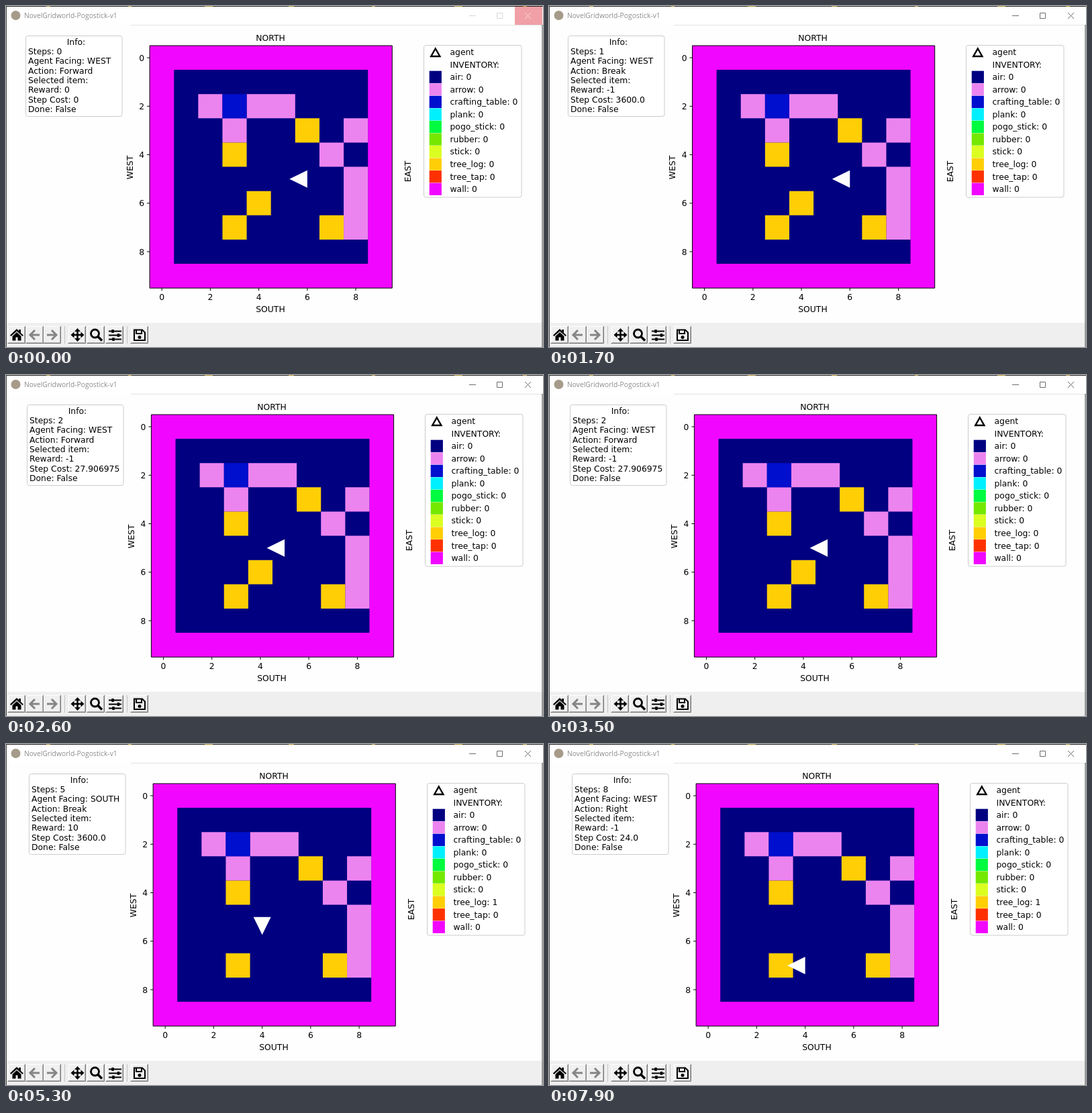
An HTML page that plays this animation: 800 px wide and 508 px high, repeating every 8000 ms.

```html
<!DOCTYPE html>
<html lang="en">
<head>
<meta charset="utf-8">
<title>Gridworld</title>
<style>
html, body { margin: 0; width: 100%; height: 100%; overflow: hidden; background: #fefefe; }
svg { display: block; width: 800px; height: 508px; }
text { font: 12.35px "DejaVu Sans", sans-serif; white-space: pre; }
.title { font: 10.3px "Open Sans", sans-serif; fill: #8c8c8c; }
.mid { text-anchor: middle; }
.end { text-anchor: end; }
.frame { fill: #fff; fill-opacity: .8; stroke: #ccc; }
.line { fill: none; stroke: #000; }
.crisp { shape-rendering: crispEdges; }
</style>
</head>
<body>
<svg viewBox="0 0 800 508">
  <rect width="800" height="508" fill="#fefefe"/>
  <rect width="800" height="28" fill="#fff"/>
  <path class="crisp" d="M186 28.5H800" stroke="#e4e4e4"/>
  <circle cx="14.5" cy="14" r="7" fill="#a69b8a"/>
  <text class="title" x="27" y="18">NovelGridworld-Pogostick-v1</text>
  <g id="controls"></g>
  <g id="plot"></g>
  <rect y="472" width="800" height="36" fill="#f0eff0"/>
  <g id="toolbar"></g>
  <path class="crisp" d="M0 .5H800" stroke="#25231f"/>
  <path class="crisp" d="M60 .5h6M182 .5h5M296 .5h12M421 .5h8M545 .5h5M668 .5h12M770 .5h6" stroke="#a98a2c"/>
  <path d="M.5 0V508M799 28V508" stroke="#444"/>
</svg>
<script>
const LOOP = 8000, CELL = 36.12, LEFT = 214.1, TOP = 59;

const ITEMS = {
  air: '#000080', arrow: '#ec84ef', crafting_table: '#000ecd', plank: '#00f0ff',
  pogo_stick: '#00fb3f', rubber: '#74e800', stick: '#dbff20', tree_log: '#ffce05',
  tree_tap: '#ff3100', wall: '#f107ff'
};
const SYMBOLS = { a: 'arrow', c: 'crafting_table', l: 'tree_log' };
const MAP = ['', '', '..acaa', '...a..l.a', '...l...a', '........a', '....l...a', '...l...la'];

const ANGLES = { WEST: 0, SOUTH: -90 };
const MOVE = 27.906975;

// [start ms, facing, action, reward, cost, agent column, agent row, figure shift]
const STEPS = [
  [0, 'WEST', 'Forward', 0, '0', 6, 5, 0],
  [1200, 'WEST', 'Break', -1, '3600.0', 6, 5, -0.6],
  [2200, 'WEST', 'Forward', -1, MOVE, 5, 5, 2.3],
  [3600, 'WEST', 'Forward', -1, MOVE, 4, 5, 5],
  [4400, 'SOUTH', 'Left', -1, '24.0', 4, 5, 5],
  [4800, 'SOUTH', 'Break', 10, '3600.0', 4, 5, 5],
  [5700, 'SOUTH', 'Forward', -1, MOVE, 4, 6, 5],
  [6500, 'SOUTH', 'Forward', -1, MOVE, 4, 7, 5],
  [6900, 'WEST', 'Right', -1, '24.0', 4, 7, 5]
];
const LOG_TAKEN = 5;

const el = id => document.getElementById(id);
const rect = (x, y, w, h, fill) =>
  `<rect x="${x}" y="${y}" width="${w}" height="${h}" fill="${fill}"/>`;
const path = (d, attrs = '') => `<path class="line" d="${d}" ${attrs}/>`;
const text = (s, x, y, cls = '', attrs = '') =>
  `<text class="${cls}" x="${x}" y="${y}" ${attrs}>${s}</text>`;
const upright = (s, x, y) => text(s, 0, 0, 'mid', `transform="translate(${x} ${y}) rotate(-90)"`);

function drawGrid(shift, logTaken) {
  const X = c => LEFT + c * CELL + shift;
  const Y = r => TOP + r * CELL;
  const box = (c, r, size) => `M${X(c)} ${Y(r)}H${X(c + size)}V${Y(r + size)}H${X(c)}Z`;

  // One path per item, so that neighbouring cells join without a seam.
  const shapes = { wall: box(0, 0, 10), air: box(1, 1, 8) };
  MAP.forEach((row, r) => [...row].forEach((symbol, c) => {
    const name = SYMBOLS[symbol], taken = logTaken && c === 4 && r === 6;
    if (name && !taken) shapes[name] = (shapes[name] || '') + box(c, r, 1);
  }));
  let out = Object.entries(shapes)
    .map(([name, d]) => `<path d="${d}" fill="${ITEMS[name]}"/>`).join('');

  let lines = box(0, 0, 10);
  for (let i = 0; i < 10; i += 2) {
    const x = X(i + .5), y = Y(i + .5);
    lines += `M${x} ${Y(10)}v4M${X(0)} ${y}h-4`;
    out += text(i, x, 438, 'mid') + text(i, X(0) - 8, y + 4.5, 'end');
  }
  return out + path(lines);
}

function drawInfo(lines) {
  return '<rect class="frame" x="29.5" y="44.5" width="143.5" height="120" rx="3"/>' +
    text('Info:', 104.5, 57.5, 'mid') +
    lines.map((line, i) => text(line, 33, 72 + i * 14.35)).join('');
}

function drawLegend(logs) {
  const labels = Object.entries(ITEMS).map(([name, color], i) => {
    const y = 105.8 + i * 18.55;
    return rect(630.7, y - 9.1, 18.2, 18.2, color) +
      text(`${name}: ${name === 'tree_log' ? logs : 0}`, 661.5, y + 4.3);
  });
  return '<rect class="frame" x="622.5" y="58.5" width="145.5" height="226.5" rx="3"/>' +
    path('M639.8 63.5L646.4 75H633.2Z', 'stroke-width="2.4"') +
    text('agent', 661.5, 73) + text('INVENTORY:', 661.5, 91.5) + labels.join('');
}

function drawControls(fading) {
  const color = fading ? '#d8d8d8' : '#6c6c6c';
  return (fading ? rect(758, 1, 41, 27, '#f0a0a6') : '') +
    path('M690 14.5h10M731.5 10.5h8v8h-8z', `style="stroke:${color}"`) +
    path('M773 10l9 9m0-9l-9 9', `style="stroke:${fading ? '#f8dcde' : color}"`);
}

function drawToolbar() {
  const buttons = [3, 30, 56, 93, 121, 149, 186].map(x =>
    rect(x, 477, 26, 26, '#f0f0f0') +
    path(`M${x + .5} 502.5v-25h25`, 'style="stroke:#fff"') +
    path(`M${x + 24.5} 478v23.5h-24`, 'style="stroke:#b4b4b4"') +
    path(`M${x + 25.5} 477v25.5h-26`, 'style="stroke:#767676"')).join('');
  const separators = path('M87.5 477v26M180.5 477v26', 'style="stroke:#c4c4c4"');
  const arrow = (x, dir) =>
    path(`M${x + 8 * dir} 490h${-15 * dir}M${x} 483l${7 * dir} 7l${-7 * dir} 7`,
      'style="stroke:#858585" stroke-width="3"');
  const home = '<path d="M6 490.5L16 481l3 3v-2h3v5l4 3.5-1.5 1.5L16 484.5 7.5 492ZM9.5 492L16 486l6.5 6v6.5h-5v-5h-3v5h-5Z"/>';
  const pan = path('M98 490h17M106.5 482v17', 'stroke-width="2.6"') +
    '<path d="M106.5 480l4.5 5h-9zM106.5 500l4.5-5h-9zM96.5 490l5-4.5v9zM116.5 490l-5-4.5v9z"/>';
  const zoom = '<circle class="line" cx="132.5" cy="488" r="6" stroke-width="2.8"/>' +
    path('M137 492.5l6 6', 'stroke-width="3.6"');
  const sliders = path('M153 484.5h19M153 490.5h19M153 496.5h19', 'stroke-width="2"') +
    path('M159 482v5M167.5 488v5M160 494v5', 'stroke-width="3.4"');
  const save = path('M191 482.5h12l4 4v11.5h-16zM194 483v5h8v-5', 'stroke-width="2"') +
    '<circle cx="199" cy="493.5" r="2.5"/>';
  return buttons + separators + home + arrow(43, -1) + arrow(68, 1) + pan + zoom + sliders + save;
}

function drawStep(n) {
  const [, facing, action, reward, cost, col, row, shift] = STEPS[n];
  const logTaken = n >= LOG_TAKEN;
  const x = LEFT + (col + .5) * CELL + shift, y = TOP + (row + .5) * CELL;
  const info = [`Steps: ${n}`, `Agent Facing: ${facing}`, `Action: ${action}`, 'Selected item:',
    `Reward: ${reward}`, `Step Cost: ${cost}`, 'Done: False'];

  el('controls').innerHTML = drawControls(n === 0);
  el('plot').innerHTML = drawGrid(shift, logTaken) +
    `<path d="M-26.5 0L0-13V13Z" fill="#fff" transform="translate(${x} ${y}) rotate(${ANGLES[facing]})"/>` +
    `<g transform="translate(${Math.round(shift)} 0)">` +
    text('NORTH', 394, 51.5, 'mid') + text('SOUTH', 394, 456, 'mid') +
    upright('WEST', 188.5, 240.5) + upright('EAST', 603, 246.5) +
    drawInfo(info) + drawLegend(logTaken ? 1 : 0) + '</g>';
}

let shown = -1;
function tick() {
  const time = performance.now() % LOOP;
  const step = STEPS.filter(([start]) => start <= time).length - 1;
  if (step !== shown) drawStep(shown = step);
  requestAnimationFrame(tick);
}
el('toolbar').innerHTML = drawToolbar();
tick();
</script>
</body>
</html>
```
